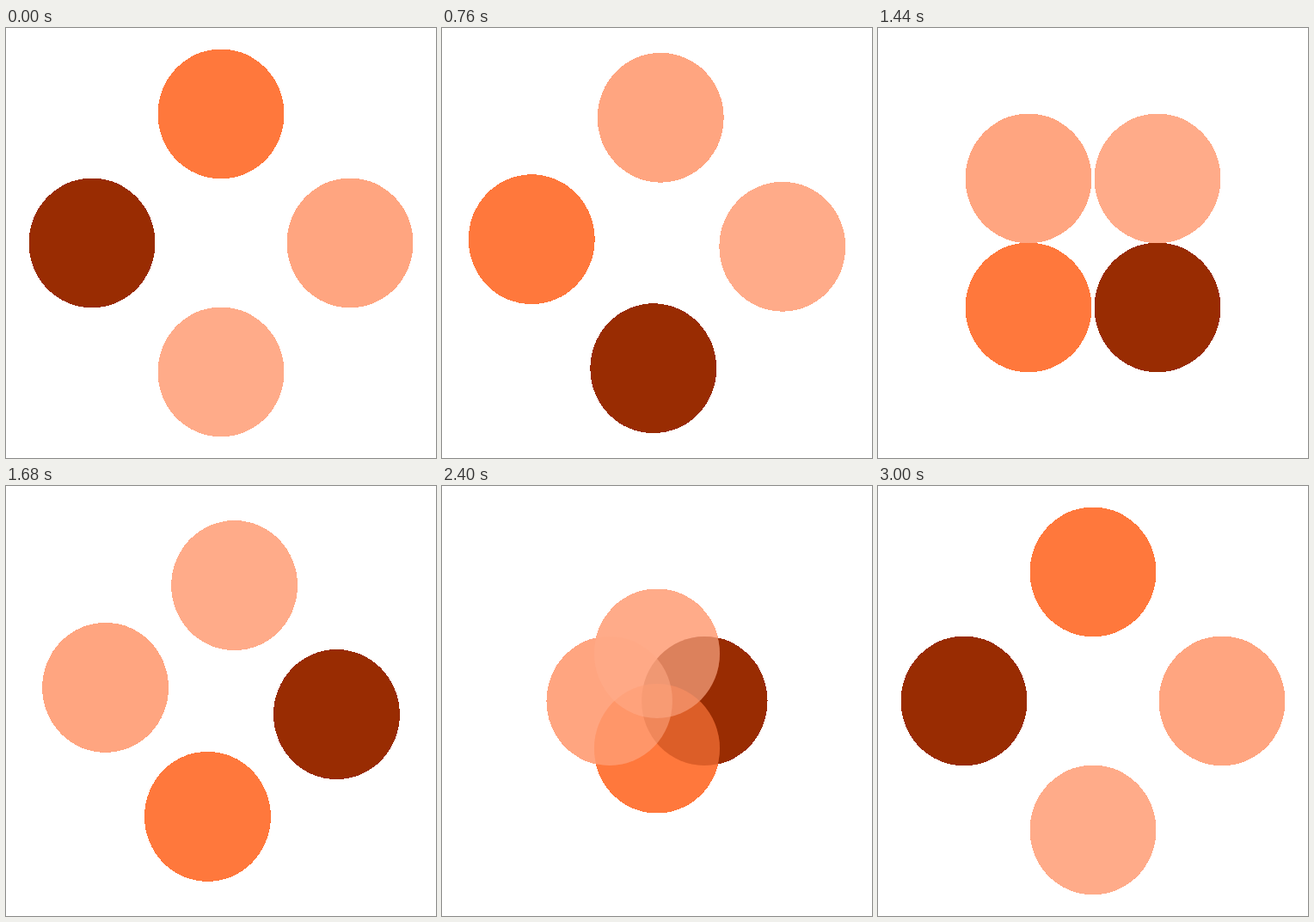
Recreate the animation shown at these times as an HTML page. Size 500x500 px, loop 3040 ms.

```html
<!DOCTYPE html>
<html lang="en">
<head>
<meta charset="utf-8">
<title>Four circles</title>
<style>
  html, body { margin: 0; width: 100%; height: 100%; overflow: hidden; background: #fff; }
  svg { display: block; width: 100%; height: 100%; }
  ellipse { fill-opacity: .5; }
</style>
</head>
<body>
<svg viewBox="0 0 500 500">
  <!-- Blend at half opacity, then make every covered pixel solid. -->
  <filter id="solid" filterUnits="userSpaceOnUse" x="0" y="0" width="500" height="500"
          color-interpolation-filters="sRGB">
    <feComponentTransfer><feFuncA type="linear" slope="255" intercept="-7"/></feComponentTransfer>
  </filter>
  <g id="dots" filter="url(#solid)">
    <ellipse rx="73" ry="75" fill="#992d02" data-slot="1"/>
    <ellipse rx="73" ry="75" fill="#ff793d" data-slot="0"/>
    <ellipse rx="73" ry="75" fill="#ffa680" data-slot="3"/>
    <ellipse rx="73" ry="75" fill="#ffab89" data-slot="2"/>
  </g>
</svg>
<script>
  const LOOP = 3040, TICK = 40, CENTER = 250, REACH = 150;
  const SLOTS = [[0, -1], [-1, 0], [0, 1], [1, 0]]; // top, left, bottom, right
  const MOVES = [
    { start: 40, length: 800, turn: 1 },
    { start: 1040, length: 800, turn: 1 },
    { start: 2040, length: 960, turn: 2 } // straight across the centre
  ];
  const dots = [...document.querySelectorAll('#dots ellipse')];

  const ease = p => p * p * (3 - 2 * p);
  const clamp = p => Math.min(1, Math.max(0, p));

  function place(dot, time) {
    let slot = +dot.dataset.slot;
    let [x, y] = SLOTS[slot];
    for (const { start, length, turn } of MOVES) {
      if (time < start) break;
      const p = ease(clamp((time - start) / length));
      const from = SLOTS[slot];
      slot = (slot + turn) % 4;
      const to = SLOTS[slot];
      x = from[0] + (to[0] - from[0]) * p;
      y = from[1] + (to[1] - from[1]) * p;
    }
    dot.setAttribute('cx', CENTER + REACH * x);
    dot.setAttribute('cy', CENTER + REACH * y);
  }

  function draw() {
    const time = Math.floor(performance.now() % LOOP / TICK) * TICK;
    dots.forEach(dot => place(dot, time));
    requestAnimationFrame(draw);
  }
  draw();
</script>
</body>
</html>
```
